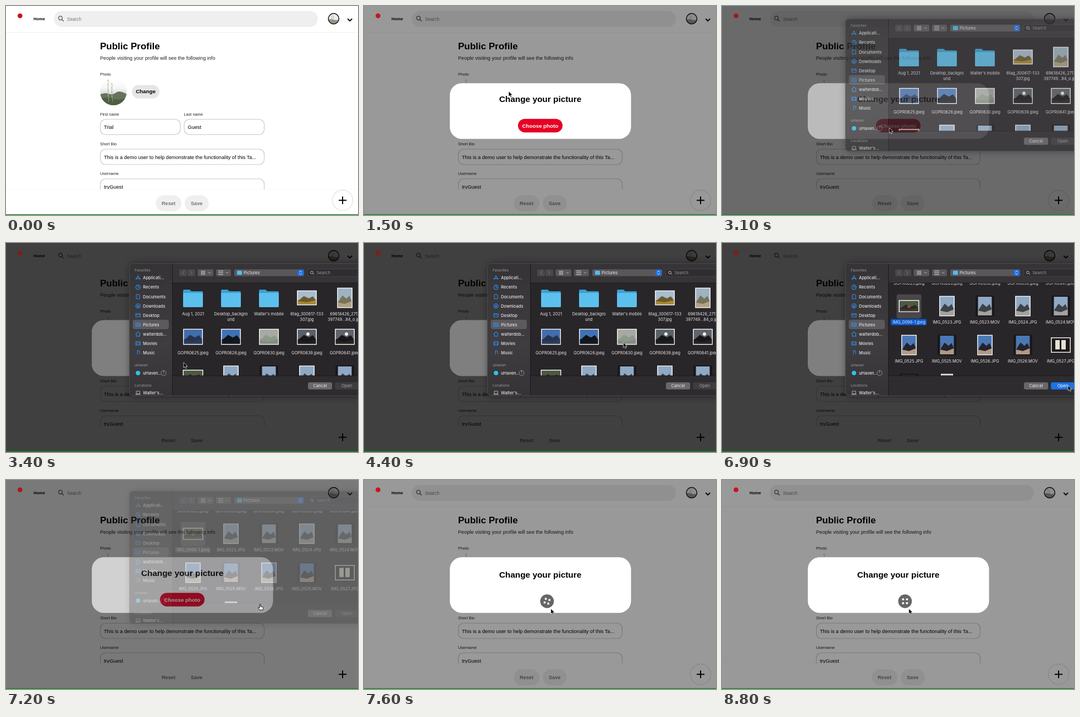
Write an HTML page that moves like this. It is 640 by 381 pixels and loops after 8.9 s.

```html
<!DOCTYPE html>
<html lang="en">
<head>
<meta charset="utf-8">
<title>Public profile</title>
<style>
html, body { margin: 0; width: 100%; height: 100%; overflow: hidden; background: #fff; }
svg { display: block; width: 640px; height: 381px; }
text { font-family: "Liberation Sans", Arial, sans-serif; white-space: pre; }
.ui { font-family: Inter, Roboto, sans-serif; }
.b { font-weight: 700; }
.m { font-weight: 500; }
.mid { text-anchor: middle; }
.line { fill: none; stroke-linecap: round; stroke-linejoin: round; }
</style>
</head>
<body>
<svg id="stage" viewBox="0 0 640 381" xmlns="http://www.w3.org/2000/svg"></svg>
<script>
const LOOP = 8900, STEP = 100;

// markup helpers
const rect = (x, y, w, h, fill, r = 0, more = '') =>
  `<rect x="${x}" y="${y}" width="${w}" height="${h}" rx="${r}" fill="${fill}" ${more}/>`;
const circle = (x, y, r, fill, more = '') => `<circle cx="${x}" cy="${y}" r="${r}" fill="${fill}" ${more}/>`;
const line = (d, color, w = 1, more = '') =>
  `<path class="line" d="${d}" stroke="${color}" stroke-width="${w}" ${more}/>`;
const shape = (d, fill) => `<path d="${d}" fill="${fill}"/>`;
const text = (x, y, size, str, fill = '#000', cls = '', more = '') =>
  `<text x="${x}" y="${y}" font-size="${size}" fill="${fill}" class="${cls}" ${more}>${str}</text>`;
const group = (id, body) => `<g id="${id}">${body}</g>`;
const lens = (x, y, r, color, w) =>
  line(`M${x + r * .7} ${y + r * .7}l${r * .9} ${r * .9}`, color, w) +
  circle(x, y, r, 'none', `stroke="${color}" stroke-width="${w}"`);

// profile page
const field = (x, y, w, label, value) =>
  text(x, y - 6.5, 7.35, label, '#222') +
  rect(x + .5, y + .5, w - 1, 28, '#fff', 9.5, 'stroke="#c9c9c9" stroke-width="1.2"') +
  text(x + 7, y + 18, 9.2, value);

const stem = (x, y, h) => line(`M${x} ${y}q-2 ${h / 2} 1 ${h}`, '#a9ab92', .8) +
  [0, .22, .45, .7].map(k => circle(x - 1 + k, y + h * k, 1, '#b9b48a')).join('');

const photo = `<g clip-path="url(#photoClip)">
  ${rect(170, 132, 50, 50, 'url(#sky)')}
  ${shape('M170 162q8-5 16-2t14-2t20 3v21h-50z', '#66735a')}
  ${shape('M170 169q14-4 25 0t25-2v16h-50z', '#4d6040')}
  ${stem(186, 135, 40)}${stem(193, 142, 32)}</g>`;

const avatar = `<g clip-path="url(#avatarClip)">
  ${rect(585, 12, 22, 22, '#e9ebea')}
  ${shape('M585 25q6-2 11 0t11-1v10h-22z', '#8d9488')}
  ${line('M592 15v12M595 18v8', '#a7aa98', .7)}</g>
  ${circle(595.7, 23.2, 9.6, 'none', 'stroke="#111" stroke-width="1.5"')}`;

const page = rect(0, 0, 640, 381, '#fff') +
  group('faintTop', line('M0 48.3H640', '#efefef') +
    rect(87, 9, 480, 29, '#efefef', 14.5) +
    line('M0 334.5H640', '#f7f7f7')) +
  text(50, 26, 7.6, 'Home', '#000', 'b') +
  lens(99, 22, 3.4, '#666', 1.5) + text(111, 26.5, 8.2, 'Search', '#777') +
  avatar + line('M621.7 23.8l3.5 3.5l3.5-3.5', '#111', 2) +
  text(171, 79, 17, 'Public Profile', '#000', 'b') +
  text(171, 98, 9.15, 'People visiting your profile will see the following info', '#222') +
  text(171, 127, 7.6, 'Photo', '#222') + photo +
  rect(229, 144, 50, 24.5, '#e6e6e6', 12.2) + text(254, 159.4, 9.8, 'Change', '#000', 'b mid') +
  `<g clip-path="url(#formClip)">` +
  field(171, 206, 146.5, 'First name', 'Trial') +
  field(323.5, 206, 146.5, 'Last name', 'Guest') +
  field(171, 260.5, 299, 'Short Bio',
    'This is a demo user to help demonstrate the functionality of this Ta...') +
  field(171, 314.5, 299, 'Username', 'tryGuest') + `</g>` +
  group('faintLow', rect(272.5, 345, 46.5, 29.5, '#efefef', 14.7) + rect(325, 345, 43.5, 29.5, '#efefef', 14.7) +
    circle(612, 354.3, 18.6, '#fff', 'stroke="#e4e4e4" stroke-width="1.4"')) +
  text(295.5, 363, 9.2, 'Reset', '#767676', 'b mid') +
  text(346.7, 363, 9.2, 'Save', '#767676', 'b mid') +
  line('M605.7 354.3h12.6M612 348v12.6', '#000', 2);

const modal = rect(156, 140.7, 329.5, 101.6, '#fff', 22) +
  group('title', text(320.5, 175, 15.4, 'Change your picture', '#000', 'b mid')) +
  group('choose', rect(280, 205.7, 81, 24.8, '#e60023', 12.4, 'id="chooseBg"') +
    text(320.4, 221.5, 9.8, 'Choose photo', '#fff', 'b mid')) +
  group('loader', circle(332.8, 221, 12.4, '#666') +
    group('dots', [[-1, -1], [1, -1], [1, 1], [-1, 1]]
      .map(([x, y]) => circle(x * 3.5, y * 3.5, 2, '#fff')).join(''))) +
  rect(156, 140.7, 329.5, 101.6, '#000', 22, 'id="modalDim"');

// file dialog
const COLS = [340, 409, 478, 547, 616];
const label = (x, y, str) => text(x, y + 2.6, 7.4, str, '#e9e7ea', 'ui mid');
const folder = x => shape(`M${x - 18} 87q0-2 2-2h10l3 3h19q2 0 2 2v25q0 2-2 2h-32q-2 0-2-2z`, '#3b9fd0') +
  rect(x - 18, 91, 36, 26, '#5cc0ee', 2);

// one thumbnail: sky, ground and a dark mass
const thumb = (x, y, w, h, sky, ground, dark, border = '#f2f2f2') => {
  const l = x - w / 2, t = y - h / 2;
  return rect(l, t, w, h, border) + rect(l + 1.5, t + 1.5, w - 3, h - 3, sky) +
    rect(l + 1.5, y + h * .15, w - 3, h * .35 - 1.5, ground) +
    shape(`M${l + 1.5} ${y + h * .22}L${x - w * .15} ${y - h * .12}L${x + w * .1} ${y + h * .04}` +
      `L${x + w * .3} ${y - h * .1}L${l + w - 1.5} ${y + h * .16}L${x} ${y + h * .3}z`, dark);
};
const still = (x, y, a, b, c) => thumb(x, y, 28, 37, a, b, c);
const movie = (x, y, a, b, c) => rect(x - 17, y - 18.5, 34, 37, '#19171a') +
  thumb(x, y, 28, 37, a, b, c, '#19171a');

const STREET = ['#8fa9c4', '#a3a29e', '#3c4248'], BIKE = ['#4b78b4', '#b09a86', '#25222a'];
const files =
  ['Aug 1, 2021', 'Desktop_backgro', 'Walter\'s mobile'].map((n, i) =>
    folder(COLS[i]) + label(COLS[i], 129, n)).join('') + label(409, 139, 'und') +
  thumb(547, 100, 36, 27, '#a9bcd0', '#a88a38', '#6b5a2a') +
  label(547, 129, '6tag_300617-133') + label(547, 139, '307.jpg') +
  thumb(616, 100, 28, 37, '#9fb2c2', '#b0a284', '#77745a') +
  label(616, 129, '69618426_2717') + label(616, 139, '397749…84_o.jpg') +
  [['25', '#416dac', '#2c3c5c', '#26344e'], ['26', '#3f72b4', '#141a22', '#10151c'],
   ['30', '#a5aaa2', '#858d82', '#8f988d'], ['39', '#5a6068', '#201f1f', '#18181a'],
   ['41', '#60636a', '#262320', '#171719']].map(([n, a, b, c], i) =>
    thumb(COLS[i], 171, 36, 29, a, b, c) + label(COLS[i], 200, `GOPR06${n}.jpeg`)).join('') +
  circle(549, 166, 3, '#f5f3ea') + circle(619, 166, 3, '#f5f3ea') +
  group('pick', rect(317.5, 220.5, 45, 44, '#4a474b', 4) + rect(307, 265.7, 65, 11, '#0b5cd6', 2.5, 'id="pickBg"')) +
  thumb(340, 242, 37, 22, '#4b5a40', '#41382f', '#2b2a26') + circle(340, 243, 3, '#8a4652') +
  label(340, 271, 'IMG_0098-1.jpeg') +
  COLS.slice(1).map((x, i) => (i % 2 ? movie : still)(x, 242, ...STREET) +
    label(x, 271, `IMG_052${3 + (i >> 1)}.${i % 2 ? 'MOV' : 'JPG'}`)).join('') +
  COLS.slice(0, 4).map((x, i) => (i % 2 ? movie : still)(x, 313, ...BIKE) +
    label(x, 342, `IMG_052${5 + (i >> 1)}.${i % 2 ? 'MOV' : 'JPG'}`)).join('') +
  rect(598, 299, 36, 28, '#f2f2f2') + rect(599.5, 300.5, 33, 25, '#1c1a18') +
  rect(606, 304, 8, 17, '#e6e0d4') + rect(617, 304, 8, 17, '#e6e0d4') + label(616, 342, 'IMG_0527.JPG') +
  movie(340, 384, '#2b292c', '#2b292c', '#222') + thumb(409, 384, 22, 37, '#b9c3cc', '#777', '#444');

const ICONS = {
  app: 'M-3.5 3L0 -4L3.5 3M-4 1H4', clock: 'M0-4a4 4 0 1 0 .01 0M0-2V0H2', doc: 'M-3-4H1L3-2V4H-3z',
  down: 'M0-4a4 4 0 1 0 .01 0M0-2V2M-2 0L0 2L2 0', desk: 'M-4-3H4V3H-4zM-4-1H4', pic: 'M-4-3H4V3H-4zM-4 2L-1-1L1 1L2 0L4 2',
  home: 'M-4 0L0-4L4 0M-3 0V4H3V0', film: 'M-4-3H4V3H-4zM-2-3V3M2-3V3', note: 'M-1 3V-4L3-3V2', laptop: 'M-3-3H3V2H-3zM-4.5 3H4.5'
};
const side = (y, name, icon, color = '#2b8df5') =>
  (icon ? line(ICONS[icon], color, 1.1, `transform="translate(240 ${y})"`) : circle(240, y, 4, '#2fc0ee')) +
  text(249, y + 2.8, 7.6, name, '#e6e4e6', 'ui m');
const head = (y, name) => text(234, y + 2.4, 6.6, name, '#8f8d90', 'ui m');

const sidebar = rect(224, 37, 79, 242, 'url(#side)') +
  rect(230.5, 140, 65.5, 17, '#5c5a5d', 4) + head(49.7, 'Favorites') +
  [['Applicati…', 'app'], ['Recents', 'clock'], ['Documents', 'doc'], ['Downloads', 'down'], ['Desktop', 'desk'],
   ['Pictures', 'pic'], ['walterdob…', 'home'], ['Movies', 'film'], ['Music', 'note']]
    .map(([n, i], k) => side(63.6 + k * 17.05, n, i)).join('') +
  head(223, 'uHaven') + side(237, 'uHaven…') +
  circle(286.5, 237, 4.6, 'none', 'stroke="#9a989b" stroke-width=".9"') + line('M286.5 237V232.5', '#9a989b', .9) +
  head(259.5, 'Locations') + side(273, 'Walter\'s…', 'laptop', '#aaa8ab');

const grid = (x, y) => [0, 4].map(a => [0, 4].map(b =>
  rect(x + a, y + b, 2.6, 2.6, 'none', .4, 'stroke="#d5d3d6" stroke-width=".8"')).join('')).join('');
const caret = x => line(`M${x} 53.3l2 2l2-2`, '#bbb9bc');

const toolbar = rect(303, 37, 345, 36, '#373438') +
  rect(315, 48, 14, 12.5, '#4b484c', 2.5) + rect(330, 48, 14, 12.5, '#4b484c', 2.5) +
  line('M323.5 51.5l-2.8 2.8l2.8 2.8M335.5 51.5l2.8 2.8l-2.8 2.8', '#7f7d80') +
  rect(348.5, 48, 28.5, 12.5, '#5a575b', 2.5) + grid(355, 51) + caret(368) +
  rect(382, 48, 27, 12.5, '#5a575b', 2.5) +
  line('M387 51h8M387 54.3h8M387 57.5h8', '#d5d3d6', 1.6, 'stroke-dasharray="1 2"') + caret(400) +
  rect(415, 48, 127, 12.5, '#5a575b', 2.5) + rect(420, 50.5, 9, 7.5, '#4fbcee', 1) +
  text(432, 57, 7.6, 'Pictures', '#f0eef1', 'ui') +
  rect(530, 48.8, 11, 11, '#1d6fe3', 2.5) + line('M533.5 53l2-2l2 2M533.5 55.6l2 2l2-2', '#fff') +
  rect(548, 47.5, 105, 13.5, '#302d31', 3, 'stroke="#4b484c" stroke-width=".8"') +
  lens(556, 53.7, 2.4, '#bbb9bc', 1) + text(564.5, 57, 7.6, 'Search', '#98969a', 'ui') +
  line('M303 73H640', '#1b191c');

const dialog = rect(226, 38, 440, 241, '#000', 8, 'opacity=".5" filter="url(#blur)"') +
  `<g clip-path="url(#dialogClip)">` + rect(303, 37, 345, 242, '#29262a') + sidebar +
  `<g clip-path="url(#listClip)">${group('files', files)}</g>` + toolbar +
  rect(303, 242, 345, 37, '#2f2c30') + line('M303 242H640M302.6 37V279', '#1b191c') +
  rect(549, 254, 44, 13, '#6a676b', 3) + text(571, 263.2, 7.6, 'Cancel', '#f0eef1', 'ui mid') +
  rect(598, 254, 45, 13, '#3f3c40', 3, 'id="openBg"') +
  text(619.5, 263.2, 7.6, 'Open', '#7d7b7e', 'ui mid', 'id="openText"') + `</g>` +
  rect(224.4, 37.4, 440, 241.2, 'none', 7, 'stroke="#5a585b" stroke-width=".7"');

const pointer = group('arrow', `<path d="M0 0V9.6L2.2 7.6L3.8 11L5.5 10.2L4 6.9H7z" fill="#000" stroke="#fff" stroke-width=".7"/>`) +
  group('hand', `<path d="M-.9.4Q0-.7.9.4V4L5 5.2Q6 6 5.4 8L4.7 10.5H-1L-3.4 6.8Q-3.5 5.2-2 5.9L-.9 7z" fill="#fff" stroke="#000" stroke-width=".9"/>`);

const clip = (id, body) => `<clipPath id="${id}">${body}</clipPath>`;
const stop = (at, color) => `<stop offset="${at}" stop-color="${color}"/>`;
const defs = `<defs>
  ${clip('photoClip', circle(195.3, 156.5, 24.3, '#000'))}
  ${clip('avatarClip', circle(595.7, 23.2, 9.6, '#000'))}
  ${clip('formClip', rect(0, 0, 640, 334, '#000'))}
  ${clip('dialogClip', rect(224, 37, 440, 242, '#000', 7))}
  ${clip('listClip', rect(303, 73, 345, 169, '#000'))}
  <linearGradient id="sky" x2="0" y2="1">${stop(0, '#fff')}${stop(.35, '#f5f7f6')}${stop(.65, '#c9d2d2')}</linearGradient>
  <linearGradient id="side" x2="0" y2="1">${stop(0, '#353335')}${stop(.6, '#3f3d3f')}${stop(1, '#353335')}</linearGradient>
  <filter id="blur" x="-10%" y="-20%" width="120%" height="140%"><feGaussianBlur stdDeviation="7"/></filter></defs>`;

const stage = document.getElementById('stage');
stage.innerHTML = defs + page +
  rect(0, 0, 640, 381, '#000', 0, 'id="overlay"') + rect(0, 0, 640, 381, '#000', 0, 'id="dim"') +
  group('modal', modal) + circle(25.5, 17.8, 4.4, '#c8141c', 'id="logo"') +
  group('dialog', dialog) + rect(0, 379.6, 640, 1.4, '#128a1c') + group('pointer', pointer);

const el = {};
stage.querySelectorAll('[id]').forEach(n => el[n.id] = n);
const set = (id, name, value) => el[id].setAttribute(name, value);
const show = (id, on) => set(id, 'display', on ? 'inline' : 'none');

// [time, value, ...] rows, straight lines between them
const PATH = [[100, 194, 257], [200, 225, 236], [300, 262, 205], [400, 288, 178], [500, 274, 160], [600, 263, 155.5],
  [1800, 263, 155.5], [1900, 271, 166], [2000, 286, 192], [2100, 299, 214], [2200, 304, 222], [3300, 304, 222],
  [3700, 380, 205], [4200, 472, 181.5], [4900, 470, 180], [5200, 346, 118], [5400, 343, 117], [5500, 440, 170],
  [5600, 622, 261], [5800, 629, 259.5], [7000, 629, 259.5], [7100, 560, 247], [7200, 462, 226.5], [7300, 395, 231], [7400, 339.7, 234.5]];
const MODAL = [[1200, 0], [1300, .4], [1400, .8], [1500, 1]];
const DIALOG = [[2900, 0, -32], [3000, .3, -24], [3100, .73, -14], [3200, .92, -5], [3300, 1, 0],
  [7000, 1, 0], [7100, .7, -8], [7200, .3, -17], [7300, .1, -25], [7400, 0, -30]];
const DIM = [[2900, 0], [3000, .25], [3100, .53], [3200, .82], [3300, 1], [7000, 1], [7100, .7], [7200, .36], [7300, .12], [7400, 0]];
const SCROLL = [[3100, 7], [3300, 0], [4400, 0], [4600, -22], [4800, -70], [5000, -112], [5200, -127]];

function at(rows, t) {
  const i = rows.findIndex(r => r[0] > t);
  if (i === 0) return rows[0].slice(1);
  if (i < 0) return rows[rows.length - 1].slice(1);
  const a = rows[i - 1], b = rows[i], k = (t - a[0]) / (b[0] - a[0]);
  return a.slice(1).map((v, n) => v + (b[n + 1] - v) * k);
}

function draw(t) {
  const [x, y] = at(PATH, t), [m] = at(MODAL, t), [d] = at(DIM, t), [alpha, drop] = at(DIALOG, t);
  const loading = t >= 7400, faint = t < 3300 || loading;
  const picked = t >= 5400, active = picked && t < 7100;
  set('overlay', 'opacity', .4 * m);
  set('dim', 'opacity', .58 * d);
  set('modal', 'opacity', m);
  set('modalDim', 'opacity', .5 * d);
  show('faintTop', faint);
  show('faintLow', faint);
  set('logo', 'fill', `rgb(${200 - 70 * d},${20 + 8 * d},28)`);

  set('title', 'transform', `translate(0 ${loading ? 2.5 : 0})`);
  show('choose', !loading);
  show('loader', loading);
  set('chooseBg', 'fill', t >= 2100 && t < 3300 ? '#c9001f' : '#e60023');
  set('dots', 'transform', `translate(332.8 221) rotate(${(t - 8800) * .36})`);

  show('dialog', alpha > 0);
  set('dialog', 'opacity', alpha);
  set('dialog', 'transform', `translate(0 ${drop})`);
  set('files', 'transform', `translate(0 ${at(SCROLL, t)[0]})`);
  show('pick', picked);
  set('pickBg', 'fill', active ? '#0b5cd6' : '#4a474b');
  set('openBg', 'fill', active ? '#1b72e6' : '#3f3c40');
  set('openText', 'fill', active ? '#fff' : '#a5a3a6');

  const hand = (t >= 500 && t < 1300) || (t >= 2100 && t < 3000) || (t >= 7200 && t < 7400);
  show('pointer', t >= 100);
  show('hand', hand);
  show('arrow', !hand);
  set('pointer', 'transform', `translate(${x} ${y})`);
}

const start = performance.now();
function tick() {
  const t = (performance.now() - start) % LOOP;
  draw(Math.floor(t / STEP) * STEP);
  requestAnimationFrame(tick);
}
tick();
</script>
</body>
</html>
```
